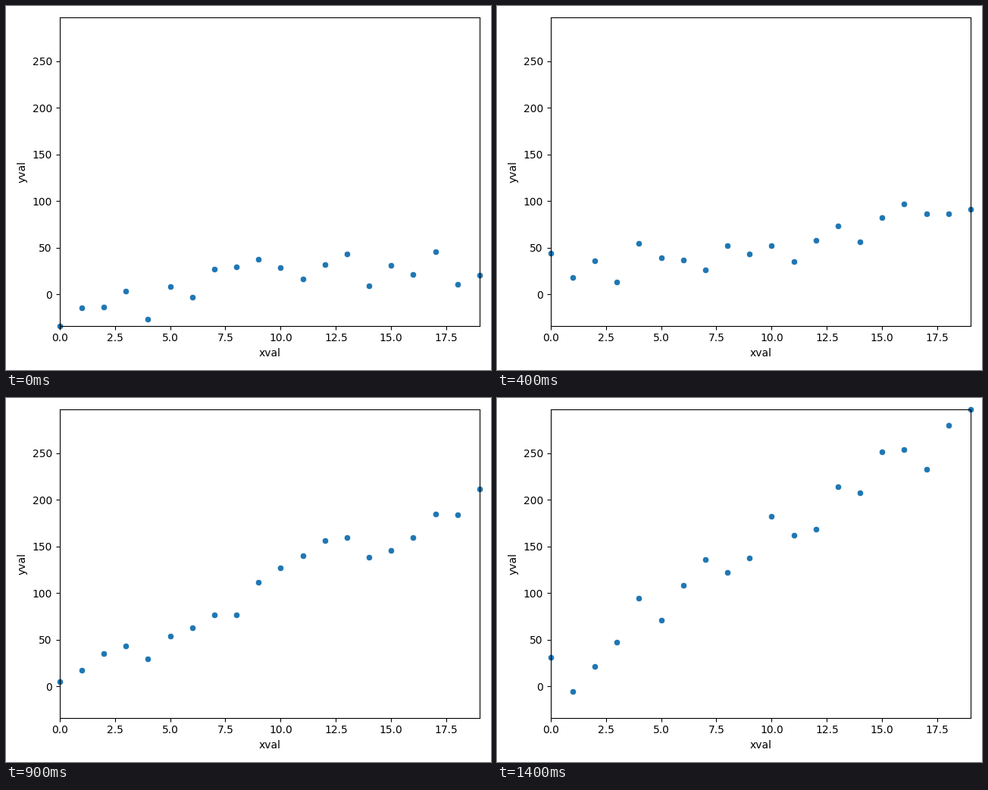
A matplotlib script for the animation above (1.5 s loop, 640 px wide and 480 px high).

```python
import numpy as np
import matplotlib.pyplot as plt
from matplotlib.animation import FuncAnimation

FRAMES, STEP_MS = 15, 100
POINTS = 20
LOW, HIGH = -33.7, 297
OFFSET, SPREAD = 6, 16

# A line through the origin steepens by one per step, with fresh noise each time.
rng = np.random.default_rng(8)
x = np.arange(POINTS)
slopes = np.arange(1, FRAMES + 1)[:, None]
noise = rng.normal(OFFSET, SPREAD, (FRAMES, POINTS))
y = np.clip(slopes * x + noise, LOW, HIGH)

# The two extreme points span the vertical axis.
y[0, 0], y[-1, -1] = LOW, HIGH

fig, ax = plt.subplots(figsize=(6.4, 4.8), dpi=100)
ax.set(xlim=(0, POINTS - 1), ylim=(LOW, HIGH), xlabel="xval", ylabel="yval")
fig.tight_layout()

dots = ax.scatter(x, y[0], s=36, color="#1f77b4", edgecolor="white",
                  linewidth=0.48, clip_on=False)


def update(step):
    dots.set_offsets(np.column_stack([x, y[step]]))
    return (dots,)


anim = FuncAnimation(fig, update, frames=FRAMES, interval=STEP_MS,
                     repeat=True, repeat_delay=0)
plt.show()
```
